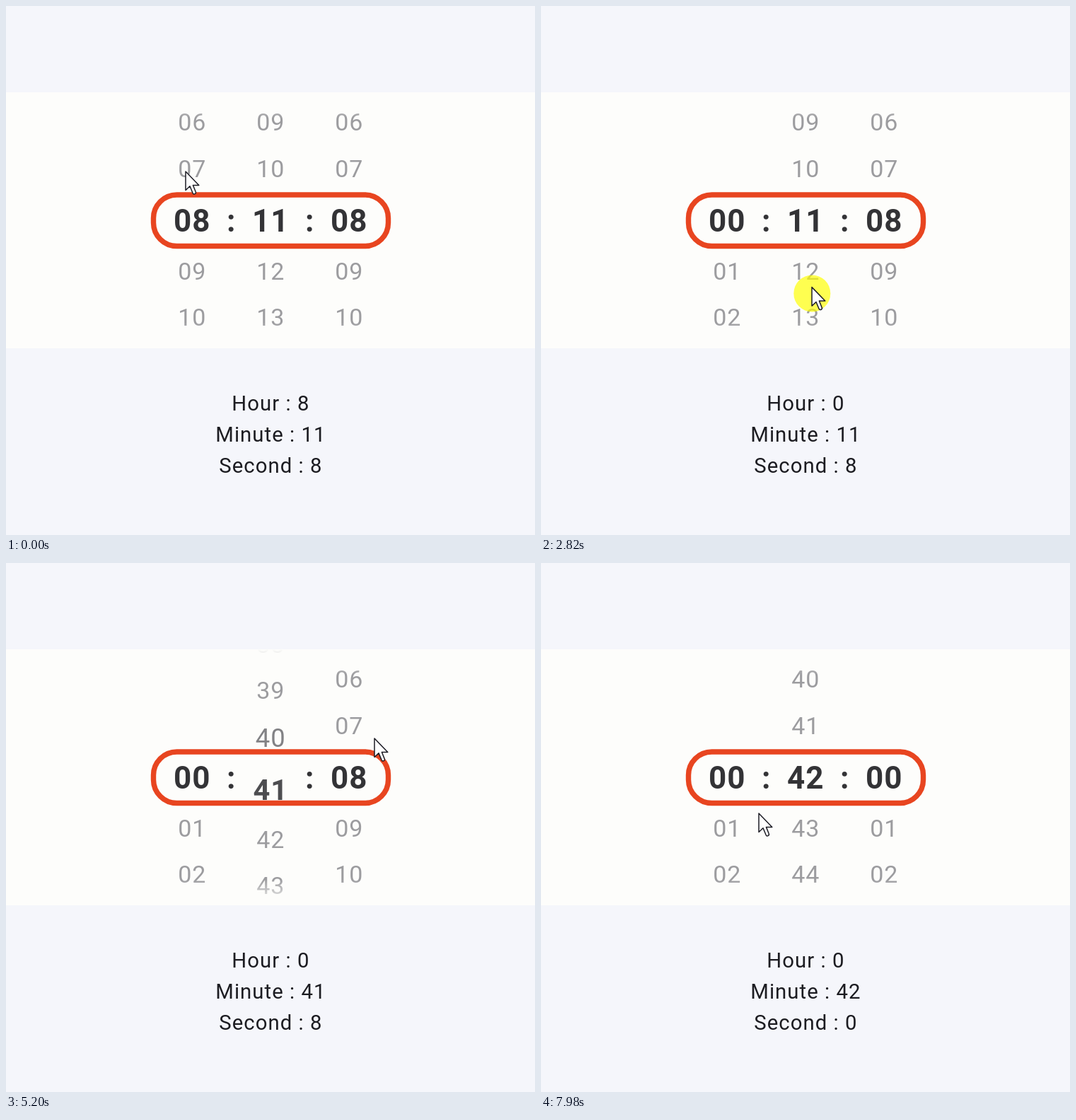
Animation of 748x748 px, one loop 8 s. Source, as an HTML page:

```html
<!DOCTYPE html>
<html lang="en">
<head>
<meta charset="utf-8">
<title>Time picker</title>
<style>
  html, body { margin: 0; width: 100%; height: 100%; overflow: hidden; background: #f5f6fb; }
  svg { display: block; width: 100vw; height: 100vh; }
  text { font-family: Roboto, sans-serif; text-anchor: middle; letter-spacing: .92px; }
  .sep { font-size: 44px; font-weight: 700; fill: #333336; }
  .label { font-size: 29.3px; letter-spacing: 1.05px; fill: #1c1c21; }
</style>
</head>
<body>
<svg viewBox="0 0 748 748">
  <defs>
    <linearGradient id="fade" x1="0" y1="122" x2="0" y2="484" gradientUnits="userSpaceOnUse">
      <stop offset="0" stop-color="#000"/>
      <stop offset=".1" stop-color="#fff"/>
      <stop offset=".9" stop-color="#fff"/>
      <stop offset="1" stop-color="#000"/>
    </linearGradient>
    <mask id="edge" maskUnits="userSpaceOnUse" x="0" y="122" width="748" height="362">
      <rect y="122" width="748" height="362" fill="url(#fade)"/>
    </mask>
  </defs>
  <rect width="748" height="748" fill="#f5f6fb"/>
  <rect y="122" width="748" height="362" fill="#fdfdfb"/>
  <rect x="208.5" y="267" width="332" height="72.5" rx="33" fill="none" stroke="#e84520" stroke-width="7.4"/>
  <text class="sep" x="318.7" y="318.6">:</text>
  <text class="sep" x="429.7" y="318.6">:</text>
  <g id="wheels" mask="url(#edge)"></g>
  <g id="labels"></g>
  <circle id="touch" r="26" fill="#ff0"/>
  <path id="cursor" d="M0 0V26.5L6 20.8L10.2 30.8Q11.4 32.6 13.2 31.6Q15 30.6 14.2 28.8L10.4 19.4H18.8Z"
        fill="#fff" stroke="#1d1d25" stroke-width="1.5" stroke-linejoin="round"/>
</svg>
<script>
const LOOP = 8000, ROWS = 8, LABEL_LAG = 60, TOUCH_LAG = 30, TOUCH_FADE = 100;
const $ = id => document.getElementById(id);
const mix = (a, b, u) => a + (b - a) * u;
const clamp = (v, lo, hi) => Math.min(Math.max(v, lo), hi);

// A flick turns a wheel by some rows; tau is its time constant in ms.
const flick = (at, by, tau) => ({ at, by, tau });
const wheels = [
  { name: 'Hour', x: 263, max: 23, from: 8, flicks: [flick(100, -3, 360), flick(1140, -12, 231)] },
  { name: 'Minute', x: 374, max: 59, from: 11, flicks: [flick(2820, 31.4, 1152), flick(6300, -.4, 100)] },
  { name: 'Second', x: 485, max: 59, from: 8, flicks: [flick(6240, -3, 360), flick(7080, -12, 231)] }
];

const turned = (f, t) => f.by * (1 - Math.exp(-Math.pow(Math.max(t - f.at, 0) / f.tau, 1.49)));
const position = (w, t) => clamp(w.flicks.reduce((p, f) => p + turned(f, t), w.from), 0, w.max);

// Flicks of less than a row are the wheel settling by itself.
const presses = wheels.flatMap(w => w.flicks)
  .filter(f => Math.abs(f.by) > 1)
  .map(f => ({ down: f.at - 60, up: f.at + .26 * f.tau }));

// Pointer stops: time, x, y.
const stops = [
  [0, 254, 234], [380, 300, 645], [1060, 268, 270], [1200, 311, 417], [1350, 368, 640],
  [2740, 384, 416], [2820, 383, 398], [3080, 415, 125], [3400, 395, 390], [3620, 420, 125],
  [3760, 424, 167], [5200, 521, 248], [6200, 517, 290], [6280, 517, 303], [6570, 530, 645],
  [7020, 515, 285], [7300, 520, 640], [7980, 308, 354]
];

// Monotone cubic through the stops along one axis.
function glide(axis) {
  const rate = i => (stops[i + 1][axis] - stops[i][axis]) / (stops[i + 1][0] - stops[i][0]);
  const slope = i => {
    if (i === 0 || i === stops.length - 1) return 0;
    const a = rate(i - 1), b = rate(i);
    return a * b > 0 ? 2 * a * b / (a + b) : 0;
  };
  return time => {
    const t = clamp(time, 0, stops.at(-1)[0]);
    const i = Math.max(stops.findIndex(s => s[0] >= t) - 1, 0);
    const [a, b] = [stops[i], stops[i + 1]];
    const h = b[0] - a[0], u = (t - a[0]) / h, v = 1 - u;
    return mix(a[axis], b[axis], u * u * (3 - 2 * u)) + u * v * h * (v * slope(i) - u * slope(i + 1));
  };
}
const cursorX = glide(1), cursorY = glide(2);

function setAttrs(el, attrs) {
  for (const k in attrs) el.setAttribute(k, attrs[k]);
}

function addText(parent, attrs) {
  const el = document.createElementNS('http://www.w3.org/2000/svg', 'text');
  setAttrs(el, attrs);
  return parent.appendChild(el);
}

wheels.forEach((w, i) => {
  w.rows = Array.from({ length: ROWS }, () => addText($('wheels'), { x: w.x + .2 }));
  w.label = addText($('labels'), { class: 'label', x: 374.4, y: 572 + 44 * i });
});

// The middle row is taller than the others.
function rowY(d) {
  const a = Math.abs(d);
  return 303 + Math.sign(d) * (72.5 * Math.min(a, 1) + 65.3 * Math.max(a - 1, 0));
}

function drawWheel(w, t) {
  const pos = position(w, t), chosen = Math.round(position(w, t - LABEL_LAG));
  const first = Math.floor(pos) - 3;
  w.rows.forEach((el, i) => {
    const n = first + i;
    if (n < 0 || n > w.max) {
      el.textContent = '';
      return;
    }
    const d = n - pos, far = Math.min(Math.abs(d), 1);
    const grey = Math.round(mix(51, 156, far));
    el.textContent = String(n).padStart(2, '0');
    setAttrs(el, {
      y: rowY(d) + mix(15.6, 11.1, far),
      'font-size': mix(44, 34, far),
      'font-weight': n === chosen ? 700 : 400,
      fill: `rgb(${grey},${grey},${grey + 3})`
    });
  });
  w.label.textContent = `${w.name} : ${chosen}`;
}

function drawPointer(t) {
  const press = presses.find(p => t >= p.down && t < p.up + TOUCH_FADE);
  let alpha = 0;
  if (press) {
    const at = Math.min(t - TOUCH_LAG, press.up);
    alpha = .68 * (1 - Math.max(t - press.up, 0) / TOUCH_FADE);
    setAttrs($('touch'), { cx: cursorX(at), cy: cursorY(at) });
  }
  setAttrs($('touch'), { opacity: alpha });
  setAttrs($('cursor'), { transform: `translate(${cursorX(t)} ${cursorY(t)})` });
}

function draw(t) {
  wheels.forEach(w => drawWheel(w, t));
  drawPointer(t);
}

const start = performance.now();
function tick() {
  draw((performance.now() - start) % LOOP);
  requestAnimationFrame(tick);
}
tick();
</script>
</body>
</html>
```
